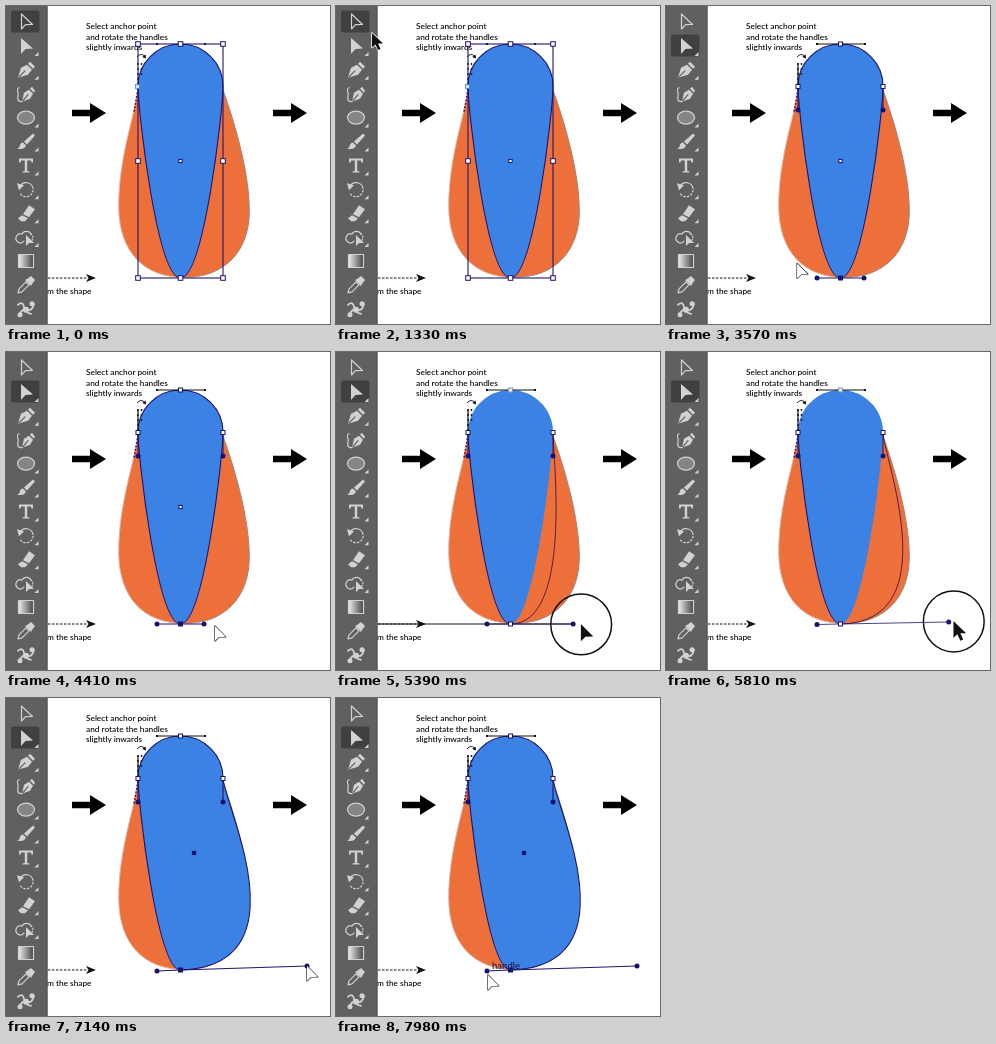
Write an HTML page that moves like this. It is 324 px wide and 318 px high and loops after 8000 ms.

```html
<!DOCTYPE html>
<html lang="en">
<head>
<meta charset="utf-8">
<title>Reshaping a petal</title>
<style>
  html, body { margin: 0; width: 100%; height: 100%; overflow: hidden; background: #fff; }
  svg { display: block; width: 100vw; height: 100vh; }
  .note { font: 500 8.300px Lato, "Open Sans", sans-serif; fill: #000; }
  .tip { font: 11.050px Inter, Roboto, sans-serif; fill: #626262; }
  .line { fill: none; stroke: #1d1670; stroke-width: 1.1; }
  .icon { fill: none; stroke: #d2d2d2; stroke-width: 1.2; stroke-linejoin: round; stroke-linecap: round; }
  .icon .f { fill: #d2d2d2; stroke: none; }
  .icon .cut { stroke: #606060; }
  #tooltip { filter: drop-shadow(3px 5px 4px rgba(0, 0, 0, .3)); }
  #cursor { paint-order: stroke; }
</style>
</head>
<body>
<svg viewBox="0 0 324 318" preserveAspectRatio="none">
  <defs>
    <linearGradient id="fade"><stop stop-color="#eee"/><stop offset="1" stop-color="#444"/></linearGradient>
    <linearGradient id="rim"><stop offset=".4" stop-color="#d9b8a6"/><stop offset=".7" stop-color="#a08078"/></linearGradient>
  </defs>
  <rect width="324" height="318" fill="#fff"/>

  <g class="note">
    <text x="80" y="23.300">Select anchor point</text>
    <text x="80" y="33.600">and rotate the handles</text>
    <text x="80" y="43.700">slightly inwards</text>
    <text x="85.500" y="287.700" text-anchor="end">from the shape</text>
  </g>
  <path id="arrow" d="M66 103.800H84V97L100 107L84 117V110.200H66Z"/>
  <use href="#arrow" x="201"/>
  <path d="M42 272H82" stroke="#111" stroke-dasharray="2.500 1.500"/>
  <path d="M80 268L90 272L80 276L82.500 272Z" fill="#111"/>
  <path d="M131 51Q135 46.500 138.500 50" fill="none" stroke="#111" stroke-width=".9"/>
  <path d="M140 52.500L136.300 51L139.500 48.500Z"/>

  <path d="M132 84C128 112 112.700 152 112.700 200C112.700 246 138 271.500 178 271.500C218 271.500 243.300 246 243.300 205C243.300 165 228 115 217 84Z"
        fill="#ed703a" stroke="url(#rim)" stroke-width="1"/>
  <path id="fill" fill="#3b82e4"/>
  <path d="M132 83L128 106" stroke="#6b1230" stroke-width="1.500" stroke-dasharray="2 1.500"/>
  <path d="M132 57V80M135.500 57V70" stroke="#222" stroke-width="1.500" stroke-dasharray="2 3"/>
  <path d="M150 38h2M198 38h2" stroke="#111" stroke-width="2"/>
  <path id="guide" stroke="#111" stroke-width="1.200"/>
  <path id="crown" class="line"/>
  <path id="left" class="line"/>
  <path id="right" class="line"/>

  <g id="frame">
    <rect class="line" x="132" y="38" width="85" height="234"/>
    <rect x="129.500" y="78.500" width="4" height="4" fill="#cfe4ff" stroke="#3b82e4" stroke-width=".8"/>
    <g id="grips"></g>
  </g>
  <g id="handles"></g>
  <rect id="mid" width="3.200" height="3.200" y="153.400" stroke="#17126e"/>
  <text id="label" class="note" x="156" y="270.500" style="font-size:9.5px;fill:#1a1a50">handle</text>

  <rect width="41.500" height="318" fill="#606060"/>
  <path d="M41 0V318" stroke="#525252"/>
  <rect id="pick" x="5" width="28.500" height="22" rx="2" fill="#404040"/>
  <g id="tools" class="icon"></g>

  <g id="tooltip">
    <rect x="20.300" y="57.800" width="141.400" height="17.400" fill="#d4d4d4" stroke="#c4c4c4" stroke-width=".6"/>
    <text class="tip" x="27" y="70.900">Direct Selection Tool (A)</text>
  </g>
  <circle id="ring" r="30.400" fill="none" stroke="#111" stroke-width="1.500"/>
  <path id="cursor" stroke-linejoin="round"/>
</svg>

<script>
const $ = id => document.getElementById(id);
const set = (el, attrs) => { for (const k in attrs) el.setAttribute(k, attrs[k]); };
const show = (id, on) => { $(id).style.display = on ? "" : "none"; };
const LOOP = 8000, CLICK = 2380, PRESS = 4890, UNSNAP = 5740, RELEASE = 7070;
const NAVY = "#17126e";

// Icons are drawn around their own centre
const icons = [
  '<path d="M-4.500-8V7L-.500 2.700L6.500 2.500Z"/>',
  '<path class="f" d="M-5-8V8L-.500 3L7 2.500Z"/>',
  '<path class="f" d="M-8 8L-5-2L1-5L6 0L2 5Z"/><path class="f" d="M2-6L4-8L9-3L7-1Z"/><path class="cut" d="M-7 7L-1 1"/>',
  '<path class="f" d="M-4 8L-2-1L3-4L7 0L4 5Z"/><path class="f" d="M4-5L6-7L9-3L8-1Z"/><path d="M-4 8C-11 8-7 2-8-1S-9-5-7-6"/><path class="cut" d="M-3 7L2 1"/>',
  '<ellipse rx="8.500" ry="6.500" fill="#858585"/>',
  '<path class="f" d="M7-8L9-6L1 3L-2 0ZM-3 1L0 4Q-2 9-9 7Q-6 6-6 3Q-5 1-3 1Z"/>',
  '<path class="f" d="M-7-7H7V-3H5.500L5-5H1.200V5.500L3.500 6V7H-3.500V6L-1.200 5.500V-5H-5L-5.500-3H-7Z"/>',
  '<path d="M-6-3A7 7 0 0 1 7-1"/><path d="M7 1A7 7 0 0 1-6 4" stroke-dasharray="1.500 2.200"/><path class="f" d="M-9-6L-2-4L-7 1Z"/>',
  '<path class="f" d="M-3 1L3-8L9-4L3 4Z"/><path class="f" d="M-4 2L2 5L-1 8H-5L-8 5Z"/>',
  '<path d="M-2 4A4.500 4.500 0 1 1-4-3A5 5 0 0 1 5-3"/><path d="M5-3A4 4 0 0 1 6 3" stroke-dasharray="1 1.800"/><path class="f" d="M0-2V9L3 6L8 6Z"/>',
  '<rect x="-7.500" y="-6.500" width="15" height="13" fill="url(#fade)"/>',
  '<path d="M-8 8L-7 4L0-3L3 0L-4 7Z"/><path class="f" d="M-1-5L1-6L5-9L9-5L6-1L5 1Z"/>',
  '<path d="M-8-4Q-3-8-2-2T5 5M-7 7Q-4-1 1 1T8-5" stroke-width="1.800"/><circle class="f" cx="6" cy="-5" r="2.500"/><circle class="f" cx="-6" cy="6" r="2.500"/><circle class="f" cx="0" cy="1" r="3"/>'
];
$("tools").innerHTML = icons.map((d, i) => {
  const corner = i && i !== 3 && i < 10 ? '<path class="f" d="M12.500 6V10H8.500Z"/>' : "";
  return `<g transform="translate(20 ${16 + i * 23.9})">${d}${corner}</g>`;
}).join("");

const square = (x, y, fill, s = 4.6, stroke = NAVY) =>
  `<rect x="${x - s / 2}" y="${y - s / 2}" width="${s}" height="${s}" fill="${fill}" stroke="${stroke}"/>`;
const dot = (x, y) => `<circle cx="${x}" cy="${y}" r="2.500" fill="${NAVY}"/>`;

for (const x of [132, 174.5, 217])
  for (const y of [38, 155, 272])
    if (x !== 174.5 || y !== 155) $("grips").innerHTML += square(x, y, "#fff");

// The petal outline in three runs: top, right side, left side
const crown = "M132 80C132 57 151 38 174.500 38C198 38 217 57 217 80";
const rightSide = (x, y) => `C217 104 ${x} ${y} 174.500 272`;
const leftSide = "C151 272 132 104 132 80";
const petal = (x, y) => crown + rightSide(x, y) + leftSide;
set($("crown"), { d: crown });
set($("left"), { d: "M174.500 272" + leftSide });

// Rows of time, x, y
const approach = [[850, 62, -20], [1330, 36, 27], [1700, 33, 30], [1960, 20, 37], [2870, 20, 37],
  [3200, 92, 190], [3800, 150, 290], [4410, 209, 274], [4860, 198, 272]];
const drag = [[4920, 198, 272], [5390, 237, 272], [5670, 272, 272], [5880, 288, 269],
  [6300, 291, 268], [6560, 291, 268], [6930, 301, 268]];
const leave = [[7140, 301, 268], [7800, 158, 276], [7900, 152, 277]];

const smooth = u => u * u * (3 - 2 * u);
function along(keys, t, ease = u => u) {
  if (t <= keys[0][0]) return keys[0].slice(1);
  const i = keys.findIndex(k => k[0] > t);
  if (i < 0) return keys[keys.length - 1].slice(1);
  const [a, b] = [keys[i - 1], keys[i]];
  const u = ease((t - a[0]) / (b[0] - a[0]));
  return [a[1] + (b[1] - a[1]) * u, a[2] + (b[2] - a[2]) * u];
}

function drawHandles(x, y, dragging) {
  const tilt = 272 + (272 - y) * .25;
  const bar = `M151 ${tilt}L174.500 272L${x} ${y}`;
  $("handles").innerHTML =
    `<path d="M151 38H200M132 57V80" stroke="#111" stroke-width="1.200"/>
     <path class="line" d="M132 80V104M217 80V104"/>
     <path class="line" d="${bar}" style="stroke-width:${dragging ? .8 : 1.1}"/>` +
    dot(132, 104) + dot(217, 104) + dot(151, tilt) + dot(x, y) +
    square(174.5, 38, dragging ? "#e8eef6" : "#fff", 4, dragging ? "#8794ab" : NAVY) +
    square(132, 80.5, "#fff", 4) + square(217, 80.5, "#fff", 4) +
    square(174.5, 272, dragging ? "#fff" : NAVY, 4);
}

function drawCursor(t, dragging) {
  const [x, y] = t < PRESS ? along(approach, t, smooth)
    : dragging ? along(drag, t + 62) : along(leave, t, smooth);
  const hollow = t > 2900 && !dragging;
  const tail = !hollow && !(dragging && t < UNSNAP);
  set($("cursor"), {
    transform: `translate(${x} ${y}) scale(${dragging ? 1.15 : 1})`,
    d: tail ? "M0 0V14.500L3.400 11.400L6 17L8.500 16L6 10.500H11Z" : "M0 0V15L4 11L10.800 10.800Z",
    fill: hollow ? "#fff" : "#111",
    stroke: hollow ? "#111" : "#fff",
    "stroke-width": hollow ? 1.2 : 1.6
  });
  set($("ring"), { cx: x + .3, cy: y + .4 });
}

function draw(t) {
  const direct = t >= CLICK, dragging = t >= PRESS && t < RELEASE, done = t >= RELEASE;
  const [hx, hy] = along(drag, t);

  set($("fill"), { d: done ? petal(hx, hy) : petal(198, 272) });
  set($("right"), {
    d: "M217 80" + rightSide(hx, hy),
    style: dragging ? "stroke:#4a1440;stroke-width:.9" : ""
  });
  show("crown", !dragging);
  show("frame", !direct);
  show("handles", direct);
  if (direct) drawHandles(hx, hy, dragging);

  show("guide", dragging && t < UNSNAP);
  set($("guide"), { d: `M42 272H${hx}` });
  show("mid", !dragging);
  set($("mid"), { x: (done ? 188 : 174.5) - 1.6, fill: done ? NAVY : "#fff" });
  show("label", t >= 7900);

  set($("pick"), { y: direct ? 28.5 : 4.5 });
  show("tooltip", t >= 2500 && t < 2950);
  show("cursor", t >= 900);
  show("ring", dragging);
  drawCursor(t, dragging);
}

const start = performance.now();
function tick(now) {
  draw(Math.max(0, now - start) % LOOP);
  requestAnimationFrame(tick);
}
draw(0);
requestAnimationFrame(tick);
</script>
</body>
</html>
```
